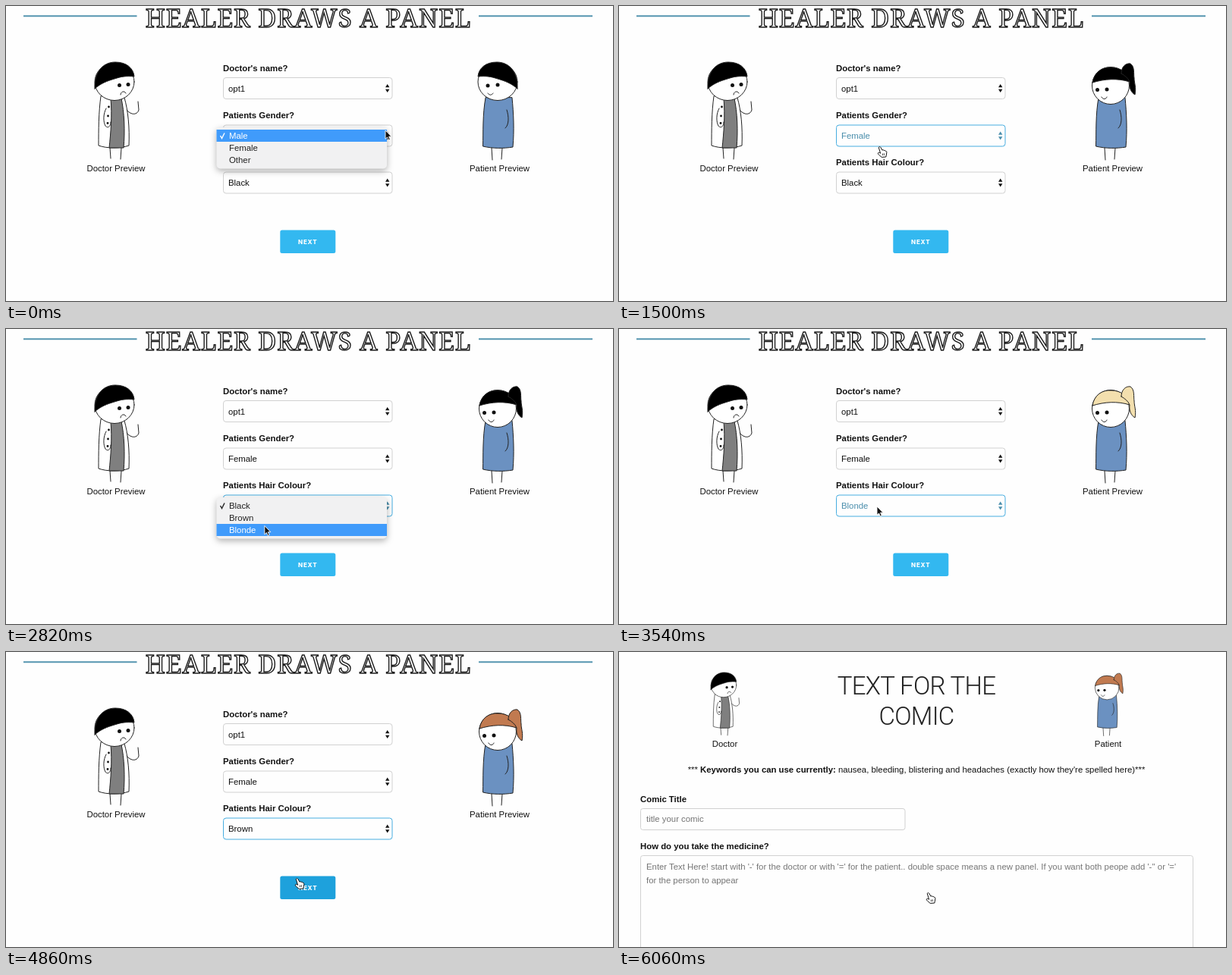
An HTML page for the animation above (6120 ms loop, 800x389 px).

```html
<!DOCTYPE html>
<html lang="en">
<head>
<meta charset="utf-8">
<title>Comic maker</title>
<style>
  html, body { margin: 0; width: 100%; height: 100%; overflow: hidden; background: #fefefe; }
  svg { display: block; width: 800px; height: 389px; font: 11.37px "Liberation Sans", Arial, sans-serif; fill: #111; }
  .bold { font-weight: 700; }
  .mid { text-anchor: middle; }
  .title { font: 33px "Noto Serif", serif; letter-spacing: 1.05px; fill: #fefefe; stroke: #1c1c1c; stroke-width: 1.4; }
  .heading { font: 300 33px Roboto, sans-serif; letter-spacing: -.7px; text-anchor: middle; fill: #222; }
  .next { font: 800 8px Inter, sans-serif; letter-spacing: .8px; fill: #fff; }
  .hint { fill: #757575; }
  .ink { fill: none; stroke: #222; stroke-width: 1; stroke-linejoin: round; stroke-linecap: round; }
  .box { fill: #fefefe; stroke: #d1d1d1; }
  .menu { filter: drop-shadow(0 3px 4px rgba(0, 0, 0, .3)); }
</style>
</head>
<body>
<svg id="stage" viewBox="0 0 800 389"></svg>
<script>
const stage = document.getElementById('stage');
const LOOP = 6120, STEP = 60, PAGE_TWO = 5520;
const HAIR = { Black: '#000', Brown: '#c17a50', Blonde: '#f3dfae' };
const LINK = '#4a8eac', FOCUS = '#47ade0';

// time, x, y of the pointer tip
const POINTER = [
  [0, 500, 164], [180, 498, 166], [660, 352, 184], [1200, 345, 186], [1500, 345, 186],
  [1800, 344, 231], [1920, 343, 239], [2040, 343, 244], [2340, 342, 248], [2640, 341, 260],
  [3300, 340, 257], [3540, 340, 234], [3840, 339, 230], [4020, 337.5, 220], [4500, 340, 222],
  [4620, 350, 236], [4860, 385, 299], [5340, 385, 299], [5760, 409, 318], [LOOP, 409, 318]
];

const MENUS = [
  { open: 0, click: 840, fade: 900, top: 160, items: ['Male', 'Female', 'Other'], checked: 0 },
  { open: 1860, click: 2880, fade: 2940, top: 222, items: ['Black', 'Brown', 'Blonde'], checked: 0 },
  { open: 3780, click: 4080, fade: 4140, top: 190.5, items: ['Black', 'Brown', 'Blonde'], checked: 2 }
];
const FADE = 180;

const text = (x, y, s, attrs = '') => `<text x="${x}" y="${y}" ${attrs}>${s}</text>`;
const ink = (d, attrs = '') => `<path class="ink" d="${d}" ${attrs}/>`;
const rect = (x, y, w, h, attrs = '') => `<rect x="${x}" y="${y}" width="${w}" height="${h}" ${attrs}/>`;
const dots = (r, ...points) => points.map(([x, y]) => `<circle cx="${x}" cy="${y}" r="${r}"/>`).join('');
const head = (x, y, rx, ry) => `<ellipse class="ink" cx="${x}" cy="${y}" rx="${rx}" ry="${ry}" style="fill:#fff"/>`;
const fill = color => `style="fill:${color}"`;

function pointerAt(t) {
  const i = POINTER.findIndex(p => p[0] > t);
  const [t0, x0, y0] = POINTER[i - 1], [t1, x1, y1] = POINTER[i];
  const u = (t - t0) / (t1 - t0), k = u * u * (3 - 2 * u);
  return { x: x0 + (x1 - x0) * k, y: y0 + (y1 - y0) * k };
}

const shortHair = color =>
  ink('M117 109C116 88 127 74 144 74C159 74 168 82 169 93C158 92 152 93 143 96C133 99 125 102 117 109Z', fill(color));

function doctor() {
  return ink('M137 187L138 201M152 187L151 202') +
    ink('M125 119C122 140 122 165 122 184C133 188 150 188 162 184C163 160 161 138 156 121Z', fill('#fff')) +
    ink('M138 122C140 144 138 168 136 187L155 187C157 165 156 140 152 122Z', fill('#7f7f7f')) +
    ink('M132 135C128 142 128 153 131 158C134 162 138 159 138 153') +
    ink('M160 138C165 144 173 144 175 137L174 126') +
    dots(1.4, [135.5, 133], [134.5, 145], [134, 154.5]) +
    head(143, 100, 26, 24.5) + shortHair('#000') +
    dots(2.5, [149.5, 104.5], [161, 103.5]) + ink('M151 117C151 113 156 111 158 115');
}

function patient(female, color) {
  const body = ink('M640 187L641 203M654 187L653 202') +
    ink('M632 121C628 143 629 166 628.5 185C641 188 656 188 668 186C670 164 669 142 667 121Z', fill('#6b91c1')) +
    ink('M660 137C663 146 663 157 658 161');
  if (!female) {
    return body + head(648, 100, 26, 24.5) +
      `<g transform="matrix(-1 0 0 1 791 0)">${shortHair(color)}</g>` +
      dots(2.5, [635, 105], [648, 104]) + ink('M635 115C637 118 640 118 642 115');
  }
  return body + head(648, 105, 24.5, 24.5) +
    ink('M624 101C626 87 637 80 649 81C662 81 671 89 673 100C657 95 640 96 624 101Z', fill(color)) +
    ink('M662 89C662 80 668 75 674 76C680 80 678 89 679 95C679 102 682 107 680 117C675 114 672 108 673 100C671 95 667 92 662 89Z', fill(color)) +
    dots(2.5, [630.5, 110.5], [643, 110]) + ink('M636 120C638 124 642 123 643 120');
}

function select(y, value, { focus, hover } = {}) {
  const color = hover ? LINK : '#111';
  return rect(286.5, y - 14, 222.5, 28, `rx="3.5" class="box" ${focus ? `style="stroke:${FOCUS}"` : ''}`) +
    text(293, y + 4, value, `fill="${color}"`) +
    `<path d="M500 ${y - 1.3}l2.7-4.2 2.7 4.2zM500 ${y + 1.3}l2.7 4.2 2.7-4.2z" fill="${color}"/>`;
}

function menu(m, t, tip) {
  const alpha = t < m.fade ? 1 : 1 - (t - m.fade) / FADE;
  const over = Math.max(0, Math.min(2, Math.floor((tip.y - m.top - 3) / 16)));
  const flashing = t >= m.click && t < m.fade;
  const rows = m.items.map((label, i) => {
    const y = m.top + 3 + i * 16, lit = i === over && !flashing;
    const color = lit ? '#fff' : '#222';
    return (lit ? rect(277.5, y, 224.5, 16, 'fill="#409bfb"') : '') +
      text(294, y + 12, label, `fill="${color}"`) +
      (i === m.checked ? `<path d="M282.5 ${y + 8}l2 3.5 3.5-7" fill="none" stroke="${color}" stroke-width="1.4"/>` : '');
  }).join('');
  return `<g class="menu" opacity="${alpha}">${rect(277.5, m.top, 224.5, 54.5, 'rx="5" fill="#f1f1f2"')}${rows}</g>`;
}

function pointer({ x, y }, hand) {
  const shape = hand
    ? '<path d="M-2.6 1C-3-.6-1-1 0 .6L2 4.3C2.7 3.3 4 3.6 4.3 4.6C5.2 4 6.2 4.5 6.3 5.4C7.3 5.2 8 6 7.8 7.2L7.4 10.2L6.8 13L1.2 13.4L-2.7 10C-4.6 8.4-3.4 6.6-1.6 7.5L-.4 8.3Z" fill="#fff" stroke="#111"/><path d="M2.3 8.5l.3 2.5M4.3 8.3l.2 2.5" stroke="#111" stroke-width=".8"/>'
    : '<path d="M0 0V11.3L2.6 9L4.3 13L6.3 12.1L4.6 8.2H8Z" stroke="#fff" stroke-width=".9"/>';
  return `<g transform="translate(${x.toFixed(1)} ${y.toFixed(1)})">${shape}</g>`;
}

function formPage(t, tip) {
  const female = t >= 960;
  const hair = t < 3000 ? 'Black' : t < 4260 ? 'Blonde' : 'Brown';
  const active = MENUS.find(m => t >= m.open && t < m.fade + FADE);
  const inside = y => !active && tip.x > 286 && tip.x < 509 && Math.abs(tip.y - y) < 16;
  const onButton = tip.y > 296 && tip.x > 361;
  const overGender = inside(171), overHair = inside(233);
  const hairOpen = active && active !== MENUS[0];
  return '<path d="M23 13.3H172.5M623 13.3H773" stroke="#5595b0" stroke-width="2"/>' +
    text(398.5, 27.5, 'HEALER DRAWS A PANEL', 'class="title mid"') +
    doctor() + patient(female, HAIR[hair]) +
    text(145, 218, 'Doctor Preview', 'class="mid"') +
    text(650.5, 218, 'Patient Preview', 'class="mid"') +
    text(286, 86, 'Doctor\'s name?', 'class="bold"') +
    text(286, 148, 'Patients Gender?', 'class="bold"') +
    text(286, 210, 'Patients Hair Colour?', 'class="bold"') +
    select(108.5, 'opt1') +
    select(171, female ? 'Female' : 'Male', { focus: t >= 900 && t < 1800, hover: overGender && t < 1800 }) +
    select(233, hair, { focus: t >= 1800, hover: hairOpen || overHair }) +
    rect(361.3, 295.5, 73, 30.5, `rx="2.5" fill="${onButton ? '#1ea1dc' : '#33b8f0'}"`) +
    text(385, 313.7, 'NEXT', 'class="next"') +
    (active ? menu(active, t, tip) : '') +
    pointer(tip, onButton || (overGender && t < 1800));
}

function textPage(tip) {
  const small = (x, art) => `<g transform="translate(${x} -21) scale(.648)">${art}</g>`;
  return small(45.2, doctor()) + small(223.3, patient(true, HAIR.Brown)) +
    text(139.5, 125, 'Doctor', 'class="mid"') + text(644.5, 125, 'Patient', 'class="mid"') +
    text(392, 56, 'TEXT FOR THE', 'class="heading"') + text(392, 95.5, 'COMIC', 'class="heading"') +
    text(392, 159, '*** <tspan class="bold">Keywords you can use currently:</tspan> nausea, bleeding, blistering and headaches (exactly how they\'re spelled here)***', 'class="mid"') +
    text(28, 197.5, 'Comic Title', 'class="bold"') +
    rect(28.5, 206.5, 348.5, 28, 'rx="3" class="box"') +
    text(36, 224, 'title your comic', 'class="hint"') +
    text(28, 260, 'How do you take the medicine?', 'class="bold"') +
    rect(28.5, 268.5, 728, 140, 'rx="3" class="box"') +
    text(36, 286.5, 'Enter Text Here! start with \'-\' for the doctor or with \'=\' for the patient.. double space means a new panel. If you want both peope add \'-\'\' or \'=\'', 'class="hint"') +
    text(36, 304.5, 'for the person to appear', 'class="hint"') +
    pointer(tip, true);
}

let shown = -1;
const start = performance.now();
function draw(now) {
  const t = Math.floor((Math.max(0, now - start) % LOOP) / STEP) * STEP;
  if (t !== shown) {
    shown = t;
    const tip = pointerAt(t);
    stage.innerHTML = t < PAGE_TWO ? formPage(t, tip) : textPage(tip);
  }
  requestAnimationFrame(draw);
}
draw(start);
</script>
</body>
</html>
```
